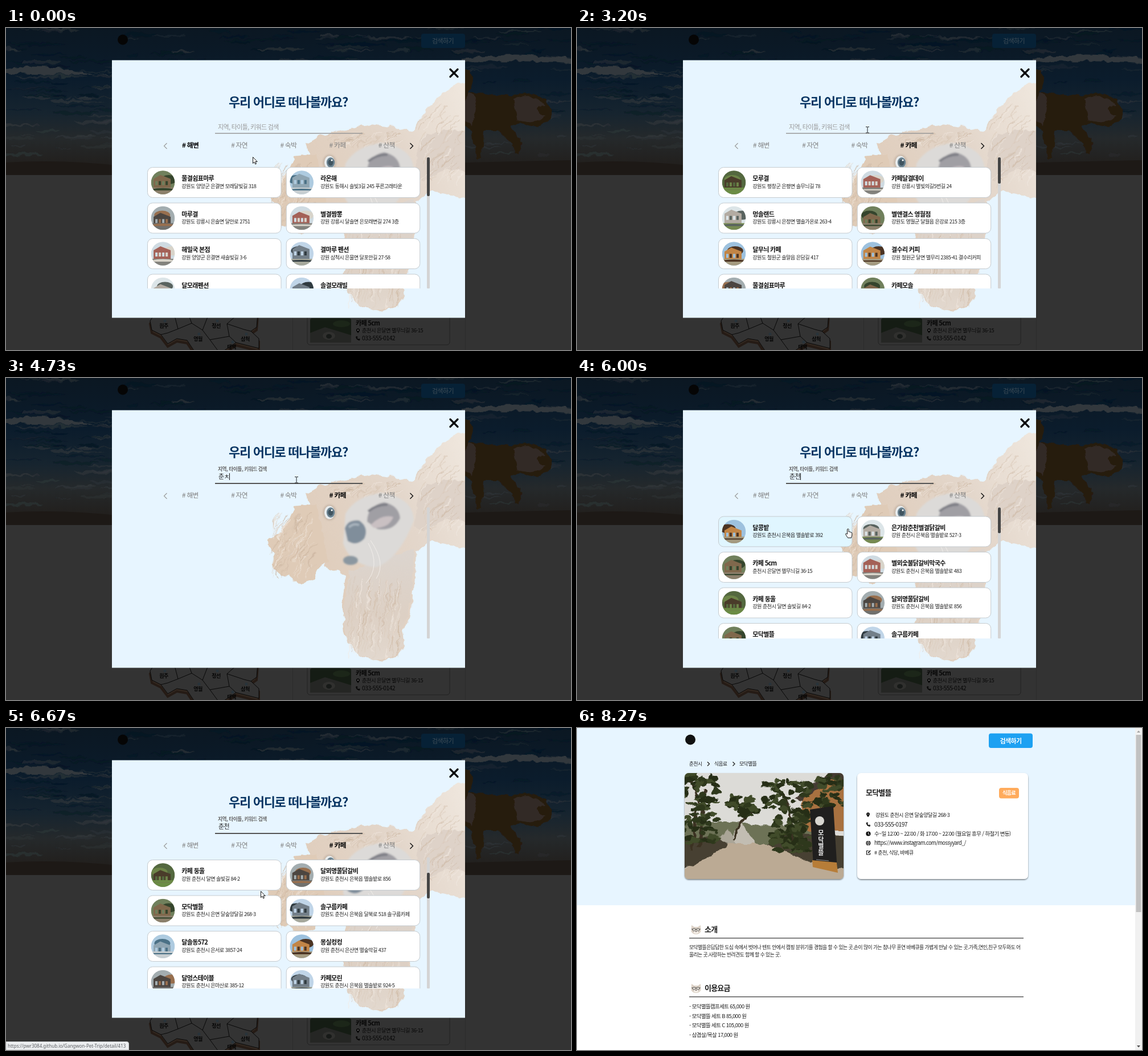
Recreate the animation shown at these times as an HTML page. Size 992x565 px, loop 8.94 s.

```html
<!DOCTYPE html>
<html lang="ko">
<head>
<meta charset="utf-8">
<title>Pet trip search</title>
<style>
html, body { margin: 0; width: 100%; height: 100%; overflow: hidden; background: #333; }
svg { display: block; width: 992px; height: 565px; }
text { font-family: "Noto Sans CJK KR", "Noto Sans CJK JP", sans-serif; letter-spacing: -.06em; white-space: pre; }
.url { font-family: "Noto Sans", sans-serif; letter-spacing: 0; }
</style>
</head>
<body>
<svg id="stage" viewBox="0 0 992 565">
  <defs>
    <clipPath id="round"><circle r="20.8"/></clipPath>
    <clipPath id="listBox"><rect x="240" y="227" width="495" height="230"/></clipPath>
    <clipPath id="modalBox"><rect x="186" y="56.5" width="620" height="452"/></clipPath>
    <clipPath id="heroBox"><rect width="992" height="258"/></clipPath>
    <clipPath id="photoBox"><rect x="189" y="79" width="279" height="186" rx="7"/></clipPath>
    <filter id="soft"><feGaussianBlur stdDeviation="1.6"/></filter>
    <filter id="rough">
      <feTurbulence type="fractalNoise" baseFrequency=".07" numOctaves="2" seed="4"/>
      <feDisplacementMap in="SourceGraphic" scale="11" xChannelSelector="R" yChannelSelector="G"/>
      <feGaussianBlur stdDeviation=".7"/>
    </filter>
    <filter id="shadow" x="-10%" y="-10%" width="120%" height="125%">
      <feDropShadow dx="0" dy="1.5" stdDeviation="1.3" flood-opacity=".5"/>
    </filter>
    <linearGradient id="sea" x2="0" y2="1">
      <stop offset="0" stop-color="#0b1722"/><stop offset=".35" stop-color="#0b1c2c"/>
      <stop offset=".58" stop-color="#16242f"/><stop offset=".75" stop-color="#25292b"/>
      <stop offset=".92" stop-color="#22201e"/><stop offset="1" stop-color="#1d1916"/>
    </linearGradient>
    <linearGradient id="fur" x1="1" y1="0" x2="0" y2=".6">
      <stop offset="0" stop-color="#f0e8df"/><stop offset=".45" stop-color="#e3d6ca"/><stop offset="1" stop-color="#dfccba"/>
    </linearGradient>
    <linearGradient id="ear" x2="0" y2="1">
      <stop offset="0" stop-color="#dcd5cf"/><stop offset=".6" stop-color="#ddd0c4"/><stop offset="1" stop-color="#e2d8ce"/>
    </linearGradient>
  </defs>
</svg>
<script>
const LOOP = 8940, ROW = 62.5, TOP = 244;
const stage = document.getElementById('stage');

function el(parent, tag, attrs = {}) {
  const node = document.createElementNS('http://www.w3.org/2000/svg', tag);
  set(node, attrs);
  return parent.appendChild(node);
}
function set(node, attrs) { for (const k in attrs) node.setAttribute(k, attrs[k]); }
const group = (p, attrs) => el(p, 'g', attrs);
const rect = (p, x, y, width, height, fill, rx = 0, more) => el(p, 'rect', { x, y, width, height, fill, rx, ...more });
const path = (p, d, fill = 'none', stroke = 'none', w = 1, more) =>
  el(p, 'path', { d, fill, stroke, 'stroke-width': w, ...more });
const dot = (p, cx, cy, r, fill, ry = r) => el(p, 'ellipse', { cx, cy, rx: r, ry, fill });
// y is the middle of the line of text
function text(p, x, y, str, size, fill, weight = 400, anchor = 'start') {
  const node = el(p, 'text', { x, y: y + size * .37, 'font-size': size, fill, 'font-weight': weight, 'text-anchor': anchor });
  node.textContent = str;
  return node;
}
function random(seed) {
  return () => (seed = (seed * 16807) % 2147483647) / 2147483647;
}
const show = (node, on) => node.setAttribute('display', on ? 'inline' : 'none');
const at = (t, steps) => steps.reduce((v, s) => t >= s[0] ? s[1] : v, steps[0][1]);
const clamp = v => Math.max(0, Math.min(1, v));
const ease = v => v * v * (3 - 2 * v);
function track(t, keys) {
  const i = keys.findIndex(k => k[0] > t);
  if (i < 0) return keys[keys.length - 1].slice(1);
  if (!i) return keys[0].slice(1);
  const [a, b] = [keys[i - 1], keys[i]], p = ease((t - a[0]) / (b[0] - a[0]));
  return [1, 2].map(n => a[n] + (b[n] - a[n]) * p);
}

// ---- dimmed home page ----
const home = group(stage);
function drawHome() {
  rect(home, 0, 0, 992, 565, '#333');
  const hero = group(home, { 'clip-path': 'url(#heroBox)' });
  rect(hero, 0, 0, 992, 258, 'url(#sea)');
  const foam = group(hero, { filter: 'url(#rough)' }), rnd = random(41);
  for (let i = 0; i < 260; i++) {
    const y = rnd() * 225, dark = y < 150 && rnd() < .5;
    const node = dot(foam, rnd() * 992, y, 8 + rnd() * 40, dark ? '#081624' : '#32383c', .8 + rnd() * 2.4);
    node.setAttribute('opacity', .25 + rnd() * .4);
  }
  path(foam, 'M0 72Q60 62 120 76T240 72V78Q120 86 0 79ZM800 52Q900 42 992 54V61Q900 56 800 60Z', '#31383d');
  path(hero, 'M0 236Q100 230 200 242T500 246T992 232V258H0Z', '#1d1916');
  const dog = group(hero, { filter: 'url(#rough)' });
  path(dog, 'M800 72L814 74L820 96L812 112Q850 118 888 120Q925 106 948 128Q966 146 954 162Q930 180 902 166L886 172L906 206L900 224L892 224L888 202L862 178L838 178L836 230L826 230L818 180L800 172Z', '#281b10');
  path(dog, 'M890 126Q920 110 944 132Q922 140 946 156Q924 172 896 160ZM812 112L826 122L818 170L802 160Z', '#332c26');
  dot(home, 205, 20.5, 9, '#050505');
  rect(home, 729, 10, 77, 25, '#062136', 4);
  text(home, 767, 23, '검색하기', 11, '#3f4d57', 500, 'middle');

  const land = 'M253 514L262 500H442L440 525L430 532L444 545V562L404 552L380 568L330 566L318 548L300 545L284 554L272 538L256 530Z';
  path(home, land, '#332820', '#251b15', 4, { transform: 'translate(0 5)' });
  path(home, land, '#333', '#080808', 1);
  path(home, 'M296 505L302 528L284 535L272 538M302 528L326 518L345 530L354 507M345 530L358 547L392 541L388 519L404 505M392 541L404 552M388 519L418 529L430 532M358 547L372 566M326 518L322 507', 'none', '#080808', 1);
  for (const [x, y, name] of [[277, 523, '원주'], [369, 523, '정선'], [337, 546, '영월'], [420, 546, '삼척'], [396, 560, '태백']]) {
    dot(home, x + 2, y - 9, 2.5, '#29343b');
    text(home, x, y, name, 9, '#060606', 700, 'middle');
  }
  path(home, 'M503.500 500V565M806.500 258V565', 'none', '#2b2b2b');
  rect(home, 529, 480, 250, 76, '#333', 5, { stroke: '#222' });
  rect(home, 534, 509, 72, 43, '#151c14', 4);
  path(home, 'M534 535L560 525L606 539V552H534Z', '#252624');
  dot(home, 567, 540, 11, '#30302e', 7);
  dot(home, 567, 541, 5, '#171a18', 4);
  dot(home, 589, 519, 15, '#1c2619', 6);
  text(home, 614, 518, '카페 5cm', 11, '#070707', 700);
  pin(home, 618, 531.5, '#070707');
  phone(home, 618, 544.5, '#070707');
  text(home, 625, 531, '춘천시 은달면 별무늬길 36-15', 9.3, '#070707');
  text(home, 625, 544, '033-555-0142', 10.5, '#070707');
}
function pin(p, x, y, fill) {
  path(p, `M${x} ${y + 4}Q${x - 3} ${y} ${x - 3} ${y - 1.2}A3 3 0 0 1 ${x + 3} ${y - 1.2}Q${x + 3} ${y} ${x} ${y + 4}Z`, fill);
  dot(p, x, y - 1.2, 1, '#fff8');
}
function phone(p, x, y, fill) {
  path(p, `M${x - 3} ${y - 3}Q${x - 2.5} ${y + 2.5} ${x + 3} ${y + 3}`, 'none', fill, 2);
  path(p, `M${x - 3.5} ${y - 3}l2.500 -.5l.8 2.500zM${x + 3} ${y + 3.5}l.5 -2.500l-2.500 -.8z`, fill);
}

// ---- search window ----
const modal = group(stage);
const tabs = [], lists = {};
function drawModal() {
  rect(modal, 186, 56.5, 620, 452, '#e7f5ff');
  drawPuppy(group(modal, { 'clip-path': 'url(#modalBox)' }));
  path(modal, 'M780 72.500L793 85.500M793 72.500L780 85.500', 'none', '#000', 3.2, { 'stroke-linecap': 'round' });
  text(modal, 495.5, 130, '우리 어디로 떠나볼까요?', 22, '#063462', 700, 'middle');
  path(modal, 'M282.500 202L277.500 207L282.500 212', 'none', '#999', 1.1);
  path(modal, 'M709.500 202L714.500 207L709.500 212', 'none', '#111', 1.4);
  ['해변', '자연', '숙박', '카페', '산책'].forEach((name, i) =>
    tabs.push(text(modal, 309 + i * 86.2, 206, '# ' + name, 11.8, '#808080')));
  rect(modal, 739, 227, 5, 230, '#d4d4d4', 1);
}
function strands(p, seed, count, x, y, w, h, dx, dy) {
  const r = random(seed);
  for (let i = 0; i < count; i++) {
    const tone = ['#c9b29c', '#f3ebe3', '#d8c6b4'][i % 3];
    path(p, `M${x + r() * w} ${y + r() * h}q${dx} ${dy * .4} ${dx * (.5 + r())} ${dy}`, 'none', tone, .6 + r() * 1.2, { opacity: .3 + r() * .35 });
  }
}
function drawPuppy(g) {
  const p = group(g, { filter: 'url(#rough)' });
  path(p, 'M812 94L788 100L766 114L748 130L736 148L724 162L714 182L676 173L640 169L590 180L550 190L527 204L545 260L560 330L596 345L590 400L594 448L608 474L626 490L655 497L686 490L700 471L696 446L712 405L717 350L719 305L748 286L812 300Z', 'url(#fur)');
  path(p, 'M724 196Q764 172 812 186V252Q774 240 738 268L716 262Z', '#ded2c8');
  path(p, 'M545 220L507 226L496 250L483 270L460 284L461 298L472 306L465 330L483 346L497 347L512 362L541 352L551 330L564 322L558 280Z', '#dfcbb7');
  path(p, 'M602 340L650 322L716 300L714 350L707 405L694 445L699 470L684 487L650 496L622 487L600 464L592 420Z', 'url(#ear)');
  strands(p, 8, 110, 478, 236, 66, 92, -12, 24);
  strands(p, 19, 130, 604, 350, 92, 115, -3, 28);
  strands(p, 31, 60, 580, 180, 120, 24, -14, 9);
  strands(p, 47, 50, 738, 130, 70, 130, -18, 22);

  const face = group(g, { filter: 'url(#soft)' });
  path(face, 'M596 238Q615 206 660 202Q715 210 716 250Q690 318 650 332Q604 328 592 290Z', '#dcdad8');
  path(face, 'M634 252Q634 224 664 218Q690 224 692 246Q680 270 652 265Z', '#a09fa4');
  path(face, 'M640 258Q660 238 680 244Q672 264 646 263Z', '#c9c0c2');
  path(face, 'M636 234Q650 222 670 222', 'none', '#7b7d84', 4);
  path(face, 'M595 264Q600 248 620 250Q638 262 629 282Q615 296 600 286Z', '#808e9b');
  path(face, 'M602 262Q610 254 620 258', 'none', '#a9b4bd', 4);
  dot(face, 605, 320, 13, '#8b97a0', 8);
  dot(face, 568, 236, 12, '#c9b9aa', 14);
  dot(g, 568, 236, 9, '#e9eef0', 11.5);
  dot(g, 570, 236, 7.2, '#6a8290', 9);
  dot(g, 570, 236, 4.5, '#40545f', 5.5);
  dot(g, 572, 232, 1.6, '#fff');
  path(g, 'M640 285Q668 325 650 352M636 290Q658 330 632 360', 'none', '#f5f2ee', .8);
}

// sky, wall, accent, ground
const scenes = [
  ['#70805c', '#80684c', '#35452d', '#8c806c'], ['#aecbe0', '#8fa5b2', '#4b7186', '#c7ced1'],
  ['#a3adb0', '#4c4641', '#986f4e', '#71716e'], ['#cfdbe2', '#a46157', '#d8d4ca', '#83827d'],
  ['#c0d5e8', '#737f89', '#303b40', '#a6a89c'], ['#54683f', '#4a3c2a', '#6d8448', '#6b8c45'],
  ['#dce5e8', '#b3aba2', '#59635f', '#768a52'], ['#9dc1de', '#c28546', '#4c3423', '#a49a80']
];
function thumb(p, x, y, kind, seed) {
  const [sky, wall, accent, ground] = scenes[kind], r = random(seed * 97 + 13);
  const g = group(p, { transform: `translate(${x} ${y})` }), c = group(g, { 'clip-path': 'url(#round)' });
  const left = -17 + r() * 12, top = -9 + r() * 8;
  rect(c, -21, -21, 42, 42, sky);
  dot(c, -12 + r() * 28, -5, 14, accent, 8);
  path(c, `M${left} 12V${top}L${left + 12} ${top - 7}L${left + 30} ${top}V12Z`, wall);
  for (let i = 0; i < 4; i++) rect(c, left + 3 + i * 6, top + 4, 4, 7, i % 2 ? accent : sky);
  rect(c, -21, 9, 42, 12, ground);
  path(c, `M-21 12Q0 ${6 + r() * 6} 21 12V14H-21Z`, accent);
}

const places = {
  beach: [68, `물결쉼표마루|강원도 양양군 은결면 모래달빛길 318|0
라온해|강원도 동해시 솔빛3길 245 푸른고래타운|1
마루결|강원도 강릉시 은솔면 달안로 2751|2
별결짬뽕|강원 강릉시 달솔면 은모래변길 274 3층|3
해밀국 본점|강원 양양군 은결면 새솔빛길 3-6|3
결마루 펜션|강원 삼척시 은물면 달포안길 27-58|4
달모래펜션|강원도 양양군 은결면 물빛길 52|6
솔결모래빌|강원도 강릉시 달솔면 은파길 73|4`],
  nature: [62, `달솔숲마당|강원도 평창군 별솔면 은숲길 184|5
은물결계곡|강원도 양양군 달결면 솔내길 57|0
별무늬언덕|강원도 강릉시 은솔면 구름마루길 92|6
솔바위쉼터|강원 삼척시 달물면 은바위길 31-4|5
구름결들판|강원 정선군 솔별면 들빛길 246|7
은달호수마당|강원도 영월군 별결면 호수빛길 68|4
달결정원|강원도 원주시 은솔면 꽃달길 42|5
솔별산책길|강원도 춘천시 달무면 솔길 15|0`],
  stay: [58, `솔결의집|강원도 양양군 달북면 은성별길 518|0
달결펜션|강원도 양양군 은양면 별솔유적로 351-46|6
강릉 별솔나무 펜션|강릉시 은달로482번길 35 (솔결동)|2
은솔하우스|강원도 양양군 달현면 별무4길 28|4
솔비여울달가람|강원도 평창군 은평면 물무늬길 374|5
양양달빛플레이스|강원도 양양군 달현면 은솔골길 23|6
해솔별펜션|강원도 양양군 은결면 달숲길 81|5
달솔소리 오토 캠핑장|강원도 홍천군 별내면 여울빛길 37|4`],
  cafe: [46, `모루결|강원도 평창군 은평면 솔무늬길 78|5
카페달결데이|강원 강릉시 별빛의길5번길 24|3
멍솔랜드|강원도 강릉시 은정면 별솔가온로 263-4|6
별앤결스 영월점|강원도 영월군 달월읍 은강로 215 3층|0
달무늬 카페|강원도 철원군 솔말읍 은담길 417|7
결수리 커피|강원 철원군 달면 별무리 2385-41 결수리커피|7
물결쉼표마루|강원도 양양군 은결면 모래달빛길 318|2
카페모솔|강원도 원주시 은솔면 달무늬길 52|0`],
  search: [45, `달콩밭|강원도 춘천시 은북읍 별솔밭로 392|7
은가람춘천별결닭갈비|강원 춘천시 은북읍 별솔밭로 527-3|6
카페 5cm|춘천시 은달면 별무늬길 36-15|0
별뫼숯불닭갈비막국수|강원도 춘천시 은북읍 별솔밭로 483|3
카페 둥울|강원 춘천시 달면 솔빛길 84-2|5
달뫼명물닭갈비|강원도 춘천시 은북읍 별솔밭로 856|2
모닥별뜰|강원도 춘천시 은면 달숲양달길 268-3|0
솔구름카페|강원도 춘천시 은북읍 달북로 518 솔구름카페|4
달솔동572|강원도 춘천시 은서로 3857-24|1
몽실컹컹|강원 춘천시 은산면 별숲막길 437|7
달멍스테이블|강원도 춘천시 은마산로 385-12|2
카페모린|강원도 춘천시 은북읍 별솔밭로 924-5|4`]
};
function drawLists() {
  const box = group(modal, { 'clip-path': 'url(#listBox)' });
  for (const key in places) {
    const [size, rows] = places[key], g = group(box);
    const cards = rows.split('\n').map((row, i) => {
      const [name, address, scene] = row.split('|'), x = 248 + i % 2 * 243.7, y = TOP + (i >> 1) * ROW;
      const card = rect(g, x + .5, y + .5, 234.5, 53, '#fff', 9, { stroke: '#c5cbcf' });
      thumb(g, x + 27.5, y + 27, +scene, i + size);
      text(g, x + 60.3, y + 20, name, 11, '#111', 700);
      text(g, x + 60.3, y + 33.3, address, 9.1, '#222');
      return { card, x, y };
    });
    lists[key] = { g, size, cards };
  }
}
drawHome();
drawModal();
drawLists();
const thumbBar = rect(modal, 739, 227, 5, 50, '#444', 2);
const underline = rect(modal, 367, 184, 259, 1.5, '#999');
const label = text(modal, 372, 174, '지역, 타이틀, 키워드 검색', 11, '#999');
const typed = text(modal, 373, 172.5, '', 11, '#222');
const caret = rect(modal, 392, 167, 1, 12, '#111');

// ---- detail page ----
const detail = group(stage);
function drawDetail() {
  const ink = '#1c1c1c';
  rect(detail, 0, 0, 992, 565, '#fff');
  rect(detail, 0, 0, 980, 311, '#e7f5ff');
  dot(detail, 199, 20.5, 9, '#111');
  rect(detail, 723, 9.5, 77, 25.5, '#1da1f2', 4);
  text(detail, 761.5, 23, '검색하기', 11, '#fff', 700, 'middle');
  text(detail, 197, 62.5, '춘천시', 8.7, ink);
  text(detail, 241, 62.5, '식음료', 8.7, ink);
  text(detail, 285, 62.5, '모닥별뜰', 8.8, ink);
  path(detail, 'M229 59.500L232.500 63L229 66.500M273.500 59.500L277 63L273.500 66.500', 'none', ink, 1.3);
  rect(detail, 189, 79, 279, 186, '#b3a793', 7, { filter: 'url(#shadow)' });
  drawGarden(group(detail, { 'clip-path': 'url(#photoBox)' }));
  rect(detail, 492, 79, 300, 186, '#fff', 7, { filter: 'url(#shadow)' });
  text(detail, 507, 113, '모닥별뜰', 13, ink, 700);
  rect(detail, 741, 105, 35, 18.5, '#ffab5c', 4);
  text(detail, 758.5, 114, '식음료', 9, '#fff', 700, 'middle');
  pin(detail, 511, 152.5, '#111');
  phone(detail, 511.5, 169, '#111');
  dot(detail, 511.5, 185.5, 4.1, '#111');
  path(detail, 'M511.500 183V186L513.500 187', 'none', '#fff', .9);
  dot(detail, 511.5, 202, 4.1, '#111');
  path(detail, 'M507.500 200.700H515.500M507.500 203.300H515.500M511.500 198Q508.500 202 511.500 206Q514.500 202 511.500 198', 'none', '#fff', .6);
  path(detail, 'M512 215.500H508.500V222H514.500V219', 'none', '#111', 1.1);
  path(detail, 'M511 219.500L515 215', 'none', '#111', 1.8);
  text(detail, 524, 152.5, '강원도 춘천시 은면 달숲양달길 268-3', 9.1, ink);
  ['033-555-0197', '수~일 12:00 ~ 22:00 / 화 17:00 ~ 22:00 (월요일 휴무 / 하절기 변동)',
    'https://www.instagram.com/mossyyard_/', '# 춘천, 식당, 바베큐']
    .forEach((line, i) => text(detail, 522, 169 + i * 16.5, line, [10.5, 9.4, 9.3, 9][i], ink));
  section(353, '소개');
  section(456, '이용요금');
  text(detail, 197, 385, '모닥별뜰은답답한 도심 속에서 벗어나 텐트 안에서 캠핑 분위기를 경험을 할 수 있는 곳.손이 많이 가는 참나무 훈연 바베큐를 가볍게 만날 수 있는 곳.가족,연인,친구 모두와도 어', 8.77, ink);
  text(detail, 197, 398, '울리는 곳.사랑하는 반려견도 함께 할 수 있는 곳.', 8.77, ink);
  ['모닥별뜰캠프세트 65,000 원', '모닥별뜰 세트 B 85,000 원', '모닥별뜰 세트 C 105,000 원', '삼겹살/목살 17,000 원']
    .forEach((line, i) => text(detail, 197, 489 + i * 16.5, '- ' + line, 9.4, ink));
  rect(detail, 980, 0, 12, 565, '#f1f1f1');
  rect(detail, 981.5, 12, 9, 311, '#c1c1c1');
  path(detail, 'M983 8L986 4.500L989 8Z', '#a3a3a3');
  path(detail, 'M983 557L986 560.500L989 557Z', '#505050');
}
function section(y, title) {
  path(detail, `M201 ${y - 7}L206 ${y - 4}H212L217 ${y - 7}L217.500 ${y + 4}Q215 ${y + 9} 209 ${y + 9}Q203 ${y + 9} 200.500 ${y + 4}Z`, '#ddd3c8');
  dot(detail, 209, y + 5, 4, '#f3eee7', 3);
  for (const x of [205.5, 212.5]) el(detail, 'circle', { cx: x, cy: y + 1, r: 2.3, fill: '#eee8df', stroke: '#444', 'stroke-width': .9 });
  path(detail, `M201 ${y}H203.500M207.500 ${y}H210.500M214.500 ${y}H217`, 'none', '#444', .9);
  dot(detail, 209, y + 4, 1, '#544');
  text(detail, 224, y, title, 13, '#1c1c1c', 700);
  rect(detail, 197, y + 15, 587, 1.3, '#444');
}
function leaves(p, seed, count, x, y, w, h) {
  const r = random(seed);
  for (let i = 0; i < count; i++)
    dot(p, x + r() * w, y + r() * h, 3 + r() * 8, ['#262f18', '#38432200', '#414b29', '#2f381e'][i % 4], 2 + r() * 4);
}
function drawGarden(g) {
  const s = group(g, { filter: 'url(#rough)' });
  rect(s, 175, 65, 310, 215, '#dcdbd7');
  path(s, 'M180 172Q240 160 300 168T415 160V215H180Z', '#6d7257');
  path(s, 'M392 122L445 86L480 84V180H395Z', '#a8713f');
  path(s, 'M384 124L442 76H480V94L446 92L394 128Z', '#453a32');
  path(s, 'M262 205L288 164L314 205Z', '#c2bdb2');
  path(s, 'M240 205L266 176L282 205Z', '#aaa597');
  path(s, 'M180 252L262 203H335L420 236L480 250V280H180Z', '#bbaa94');
  path(s, 'M180 196L240 188L264 204L212 238L180 248ZM333 203L372 184L480 190V252L416 238Z', '#464030');
  path(s, 'M196 78L212 130L202 215M226 108L214 210M374 208Q386 160 360 112M308 146Q284 162 276 196', 'none', '#3b3022', 4.5);
  leaves(s, 23, 130, 180, 76, 66, 126);
  leaves(s, 57, 45, 268, 120, 48, 34);
  leaves(s, 71, 120, 330, 92, 78, 98);
  leaves(s, 93, 70, 342, 178, 66, 40);
  leaves(s, 37, 50, 424, 82, 48, 55);
  path(g, 'M409 143L450 137L457 250L415 242Z', '#201f1e');
  path(g, 'M413 232L456 236L458 254L414 244Z', '#b77d38');
  dot(g, 426, 163, 8, '#d8d6d0');
  [...'모닥별뜰'].forEach((c, i) => text(g, 428, 184 + i * 11.5, c, 11, '#eee', 700, 'middle'));
  path(g, 'M420 231L442 233', 'none', '#999', 1);
}
drawDetail();

// ---- status bubble and pointers ----
const status = group(stage);
path(status, 'M0 565V550.500H212Q215.500 550.500 215.500 554V565Z', '#eceef0', '#c4c6c8');
const statusText = text(status, 3, 558, '', 8, '#5c5f63');
statusText.setAttribute('class', 'url');

const pointers = { arrow: group(stage), hand: group(stage), beam: group(stage) };
path(pointers.arrow, 'M.5 .5V11.500L3 9.200L4.800 13L6.500 12.200L4.800 8.500H8.200Z', '#fff', '#000', .9);
path(pointers.hand, 'M4 1Q5.500 0 6 1.500V6Q7.500 5 8 6.300Q9.500 5.500 10 7Q11.800 6.500 11.800 8.500V12L10.500 16.500H4.500L1 11Q-.2 9 1.500 8.800L3.500 10V2Z', '#fff', '#000', .9);
path(pointers.beam, 'M0 .5H2.500L3 1L3.500 .5H6M3 1V10.500M0 11H2.500L3 10.500L3.500 11H6', 'none', '#222', 1);

const route = [
  [330, 433, 226], [600, 415, 208], [1130, 415, 208], [1600, 490, 206], [1800, 490, 206],
  [2000, 558, 203], [2400, 578, 202], [2730, 578, 202], [3200, 507, 173], [5500, 507, 173],
  [5930, 471, 264], [6400, 471, 264], [6670, 447, 286], [7050, 440, 317], [7560, 440, 317],
  [7850, 506, 430], [8200, 502, 580]
];
const typing = [[0, ''], [4270, 'ㅊ'], [4400, '추'], [4530, '춘'], [4730, '춘ㅊ'], [4870, '춘처'], [4930, '춘천']];
const listSteps = [[0, 'beach'], [870, 'nature'], [1800, 'stay'], [2730, 'cafe'], [4270, ''], [4530, 'search'], [4730, ''], [4930, 'search']];
const tabSteps = [[0, 0], [870, 1], [1800, 2], [2730, 3]];
const caretStarts = [[0, 1e9], [3400, 3400], ...typing.slice(1).map(([time]) => [time, time])];
const pageIds = [[0, 0], [6250, 413], [6850, 0], [6950, 415], [7650, 0]];

function render(t) {
  const onDetail = t >= 7330;
  show(home, !onDetail);
  show(modal, !onDetail);
  show(detail, onDetail);

  const active = at(t, tabSteps);
  tabs.forEach((tab, i) => set(tab, { fill: i === active ? '#000' : '#808080', 'font-weight': i === active ? 700 : 400 }));

  const [x, y] = track(t, route);
  const current = at(t, listSteps), scroll = 138 * ease(clamp((t - 5980) / 340));
  let overCard = false;
  for (const key in lists) {
    const { g, size, cards } = lists[key];
    show(g, key === current);
    if (key !== current) continue;
    g.setAttribute('transform', `translate(0 ${-scroll})`);
    set(thumbBar, { y: 227 + scroll * size / 230, height: size });
    for (const c of cards) {
      const cy = c.y - scroll, over = x + 3 > c.x && x + 3 < c.x + 235 && y > cy && y < cy + 41.5;
      c.card.setAttribute('fill', over ? '#e0f6ff' : '#fff');
      overCard = overCard || over;
    }
  }
  show(thumbBar, current);

  const focus = ease(clamp((t - 3400) / 500)), size = 11 - 2.25 * focus;
  set(label, { y: 174 - 14.3 * focus + size * .37, 'font-size': size, fill: focus > .5 ? '#666' : '#999', 'font-weight': focus > .5 ? 700 : 400 });
  set(underline, { height: 1.5 + .5 * focus, fill: focus > .5 ? '#555' : '#999' });
  typed.textContent = at(t, typing);
  const since = t - at(t, caretStarts);
  show(caret, since >= 0 && Math.floor(since / 530) % 2 === 0);
  caret.setAttribute('x', 373 + typed.getComputedTextLength());

  const id = at(t, pageIds);
  show(status, id);
  statusText.textContent = `https://pwr3084.github.io/Gangwon-Pet-Trip/detail/${id}`;

  const onTab = t > 500 && t < 1850 || t > 2200 && t < 2800;
  const kind = onDetail ? 'arrow' : overCard || onTab ? 'hand' : y < 180 ? 'beam' : 'arrow';
  for (const key in pointers) {
    show(pointers[key], key === kind);
    pointers[key].setAttribute('transform', `translate(${x} ${y})`);
  }
}

const start = performance.now();
function tick() {
  render((performance.now() - start) % LOOP);
  requestAnimationFrame(tick);
}
tick();
</script>
</body>
</html>
```
